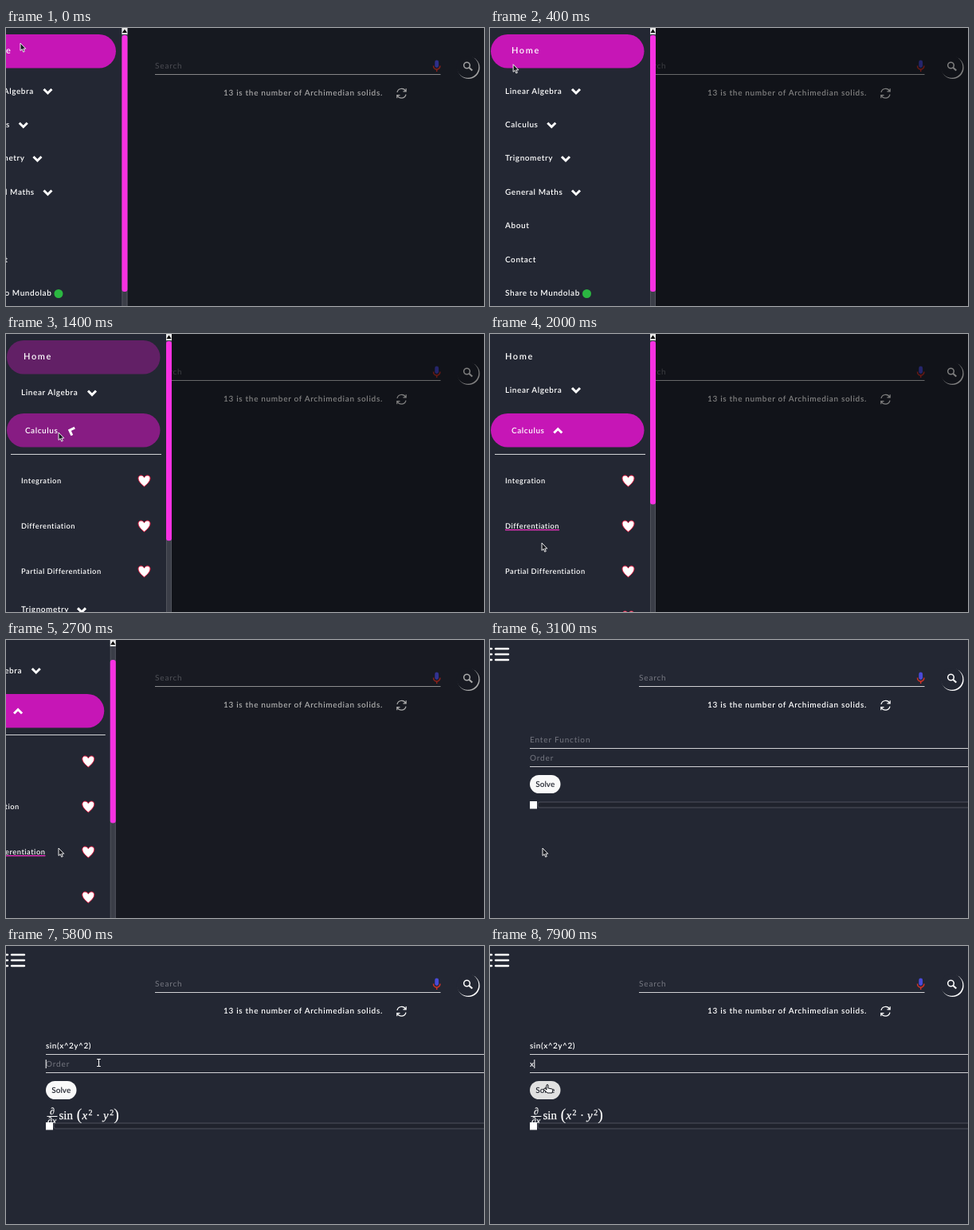
Recreate the animation shown at these times as an HTML page. Size 600 by 350 pixels, loop 8 s.

```html
<!DOCTYPE html>
<html lang="en">
<head>
<meta charset="utf-8">
<title>Maths solver</title>
<style>
  html, body { margin: 0; width: 100%; height: 100%; overflow: hidden; background: #232733; }
  svg { display: block; width: 600px; height: 350px; }
  text { font: 10px Lato, sans-serif; fill: #fff; text-rendering: geometricPrecision; white-space: pre; }
  .fact { font-weight: 600; letter-spacing: .68px; }
  .value { font-weight: 600; letter-spacing: .5px; }
  .hint { fill: #757780; letter-spacing: .85px; }
  .menu text { font-weight: 600; letter-spacing: .58px; }
  .menu .home { font-size: 11px; letter-spacing: 1.6px; }
  #topics text { font-size: 9.3px; letter-spacing: .5px; }
  .pill { fill: #c616b6; }
  .line { fill: none; stroke: #fff; }
  .rule { fill: none; stroke: #d2d3d6; }
  .math text { font: 15px "Liberation Serif", serif; stroke: #fff; stroke-width: .25; }
  .math .it { font-style: italic; }
  .math .sup { font-size: 10px; }
  .math .frac { font-size: 12px; }
  .math .big { font-size: 21px; stroke-width: 0; }
</style>
</head>
<body>
<svg viewBox="0 0 600 350">
  <defs>
    <path id="chev" d="M-5-2.5 0 2.5 5-2.5" fill="none" stroke="#fff" stroke-width="3"/>
    <path id="heart" d="M0 7C-4 4-7.5 0-7.5-3.2-7.5-7.8-2-8.3 0-4.3 2-8.3 7.5-7.8 7.5-3.2 7.5 0 4 4 0 7Z" fill="#fff" stroke="#e0183f"/>
    <clipPath id="fold"><rect id="foldBox" x="0" y="146" width="201" height="0"/></clipPath>
    <clipPath id="mathBox"><rect x="48" y="198" width="552" height="25"/></clipPath>
  </defs>
  <rect width="600" height="350" fill="#232733"/>

  <g class="line" stroke-width="2.4" stroke-linecap="round">
    <path d="M7 11H23M7 18H23M7 25H23M.5 11H2M.5 18H2M.5 25H2"/>
  </g>
  <text class="hint" x="187" y="51">Search</text>
  <path class="rule" d="M187 58.5H545.5"/>
  <g fill="none">
    <path d="M536.5 47.5a4.2 4.6 0 0 0 8.4 0M540.7 52v3" stroke="#d23228" stroke-width="1.5"/>
    <rect x="538.3" y="40.5" width="4.8" height="9.5" rx="2.4" fill="#4a4ad8"/>
  </g>
  <circle cx="580.6" cy="50" r="14" fill="#fff"/>
  <circle cx="579.5" cy="48.9" r="13.8" fill="#232733"/>
  <g class="line" stroke-width="1.5">
    <circle cx="578.5" cy="47" r="3.8"/>
    <path d="M581.4 49.9 585.3 53.6" stroke-width="2"/>
  </g>
  <text class="fact" x="273" y="85">13 is the number of Archimedian solids.</text>
  <path class="line" stroke-width="1.2" d="M491 81a5.7 5.7 0 0 1 10.6-1.6M502.2 76.3v3.6h-3.7M502 83.6a5.7 5.7 0 0 1-10.6 1.6M490.8 88.3v-3.6h3.7"/>

  <g id="form">
    <text id="func" x="50" y="129"></text>
    <text id="order" x="50" y="151.5"></text>
    <path class="rule" d="M50 136.5H600M50 159.5H600"/>
    <rect id="caret" x="49.7" width="1" height="11" fill="#fff"/>
    <rect id="solve" x="50" y="170" width="38.5" height="23" rx="11.5"/>
    <text x="57.3" y="185" style="fill:#22252f;font-weight:600">Solve</text>
    <g id="bar">
      <rect x="60" y="204" width="545" height="7" rx="3" fill="#20232d" stroke="#3f424d" stroke-width="1.4"/>
      <rect x="50" y="203" width="9" height="9.5" fill="#fff"/>
    </g>
    <g class="math" clip-path="url(#mathBox)">
      <g data-from="1">
        <text class="it frac" x="55" y="212">∂</text>
        <path class="line" d="M51.5 214.5H64.5"/>
        <text class="it frac" x="52" y="223.5">∂x</text>
      </g>
      <text data-from="3" x="66.5" y="218">sin</text>
      <text data-from="4" class="big" x="88.5" y="218.5">(</text>
      <text data-from="5" class="it" x="95.5" y="218">x</text>
      <text data-from="7" class="sup" x="103.5" y="212.5">2</text>
      <text data-from="8" x="113" y="218">·</text>
      <text data-from="8" class="it" x="122" y="218">y</text>
      <text data-from="10" class="sup" x="130.3" y="212.5">2</text>
      <text data-from="11" class="big" x="135" y="218.5">)</text>
    </g>
  </g>

  <rect id="shade" width="600" height="350"/>

  <g id="side" class="menu">
    <rect width="208" height="350" fill="#232733"/>
    <g id="list">
      <rect id="homePill" class="pill" x="1" y="8" width="192.5" height="42.5" rx="21.2"/>
      <text id="home" class="home" y="32">Home</text>
      <g id="linear">
        <text x="19" y="82.5">Linear Algebra</text>
        <use href="#chev" x="108" y="79.5"/>
      </g>
      <rect id="calcPill" class="pill" x="1" y="100" width="192.5" height="42.5" rx="21.2"/>
      <g id="calc">
        <text x="19" y="124.5">Calculus</text>
        <g id="calcChev"><use href="#chev"/></g>
      </g>
      <g clip-path="url(#fold)">
        <path class="rule" d="M6 151.5H195"/>
        <g id="topics"></g>
      </g>
      <g id="rest">
        <text x="19" y="167">Trignometry</text><use href="#chev" x="95" y="164.5"/>
        <text x="19" y="209.5">General Maths</text><use href="#chev" x="108" y="207"/>
        <text x="19" y="252">About</text>
        <text x="19" y="294.5">Contact</text>
        <text x="19" y="337">Share to Mundolab</text>
        <circle cx="121.5" cy="334.5" r="5.5" fill="#2bb741"/>
      </g>
    </g>
    <rect x="201" width="7" height="350" fill="#3b3e48"/>
    <path d="M201.5 0V350M207.5 0V350" stroke="#50535c"/>
    <rect x="201" width="7" height="8" fill="#e8e8e8"/>
    <path d="M201.5 6 204.5 1.5 207.5 6Z"/>
    <rect id="thumb" x="201" width="7" rx="3" fill="#f731e2"/>
  </g>

  <g id="pointer">
    <path data-kind="arrow" d="M0 0V9.5L2.2 7.6 3.7 11.2 5.3 10.5 3.8 7.1H6.8Z" fill="#15171d" stroke="#fff" stroke-width=".9"/>
    <path data-kind="beam" class="line" d="M-2.3-4.5H-.6L0-4 .6-4.5H2.3M-2.3 4.5H-.6L0 4 .6 4.5H2.3M0-4.2V4.2" stroke-width="1.1"/>
    <path data-kind="hand" d="M-1-4Q0-5 1-4V0L6 1Q7 1.3 6.8 3L6 6H0L-4.5 1.5Q-4.5 0-3 .3L-1 2Z" fill="#f4f4f4" stroke="#15171d"/>
  </g>
</svg>
<script>
const LOOP = 8000, FORMULA = "sin(x^2y^2)", TYPE_AT = 4550, KEY_MS = 90, ROW = 57;
const ui = Object.fromEntries([...document.querySelectorAll("[id]")].map(e => [e.id, e]));
const set = (e, attrs) => { for (const k in attrs) e.setAttribute(k, attrs[k]); };
const move = (e, x, y) => e.setAttribute("transform", `translate(${x} ${y})`);
const clamp = (v, lo = 0, hi = 1) => Math.min(hi, Math.max(lo, v));
const mix = (a, b, p) => a + (b - a) * p;
const ease = (t, from, to) => { const p = clamp((t - from) / (to - from)); return p * p * (3 - 2 * p); };

// time, x, y of the pointer
const PATH = [
  [0, 18, 19], [250, 22, 30], [900, 74, 145], [1150, 66, 124], [1550, 66, 124],
  [2000, 65, 263], [2150, 66, 262], [3200, 66, 262], [3700, 150, 190], [4050, 154, 129],
  [4600, 154, 129], [5400, 134, 130], [5700, 116.5, 147], [6900, 116.5, 147], [7600, 72, 179]
];
function pointerAt(t) {
  const i = PATH.findIndex(k => k[0] > t);
  if (i < 0) return PATH.at(-1).slice(1);
  const a = PATH[i - 1], b = PATH[i], p = ease(t, a[0], b[0]);
  return [mix(a[1], b[1], p), mix(a[2], b[2], p)];
}

ui.topics.innerHTML = ["Integration", "Differentiation", "Partial Differentiation", "Limits", "Series"]
  .map((name, i) => `<g><text x="19" y="${187.5 + i * ROW}">${name}</text>
    <path stroke="#f731c8" stroke-width="1.4" d=""/><use href="#heart" x="173.5" y="${185 + i * ROW}"/></g>`).join("");
const topics = [...ui.topics.children];
const terms = [...document.querySelectorAll("[data-from]")];
const kinds = [...document.querySelectorAll("[data-kind]")];

function drawMenu(t, y) {
  const off = t < 2000 ? -56 * (1 - clamp(t / 250)) ** 2 : -208 * ease(t, 2545, 2945);
  const open = ease(t, 1200, 1550), scroll = 32 * ease(t, 2200, 2450);
  move(ui.side, off, 0);
  ui.side.style.display = off > -208 ? "" : "none";
  set(ui.shade, { opacity: .5 * (1 + off / 208) });
  move(ui.list, 0, -scroll);
  set(ui.homePill, { opacity: 1 - open });
  set(ui.home, { x: mix(27, 19, open) });
  move(ui.linear, 0, -9 * open);
  set(ui.calcPill, { opacity: open });
  move(ui.calc, 8 * open, 0);
  set(ui.calcChev, { transform: `translate(77.3 122) rotate(${180 * open})` });
  set(ui.foldBox, { height: 300 * open });
  move(ui.rest, 0, 300 * open);
  set(ui.thumb, { y: 9 + scroll / 2, height: mix(323, 205.5, open) });
  topics.forEach((g, i) => {
    const hot = open > .9 && Math.abs(y + scroll - 184 - i * ROW) < ROW / 2;
    const [label, rule] = g.children;
    set(rule, { d: hot ? `M19 ${189.6 + i * ROW}h${label.getComputedTextLength()}` : "" });
  });
}

function field(e, value, hint) {
  e.textContent = value || hint;
  e.setAttribute("class", value ? "value" : "hint");
}

function drawForm(t) {
  ui.form.style.display = t >= 3000 ? "" : "none";
  const keys = clamp(Math.floor((t - TYPE_AT) / KEY_MS) + 1, 0, FORMULA.length);
  const order = t >= 6700 ? "x" : "";
  field(ui.func, FORMULA.slice(0, keys), "Enter Function");
  field(ui.order, order, "Order");
  terms.forEach(e => e.style.display = keys >= +e.dataset.from ? "" : "none");
  move(ui.bar, 0, keys ? 19 : 0);

  const second = t >= 5650, input = second ? ui.order : ui.func;
  const since = order ? 6700 : second ? 5650 : keys ? TYPE_AT + (keys - 1) * KEY_MS : 4100;
  const filled = second ? order : keys;
  set(ui.caret, {
    x: filled ? 49.7 + input.getComputedTextLength() : 49.7,
    y: second ? 143 : 120,
    opacity: t >= since && (t - since) % 1060 < 530 ? 1 : 0
  });
  const tone = Math.round(mix(249, 225, ease(t, 7500, 7850)));
  set(ui.solve, { fill: `rgb(${tone},${tone},${tone})` });
}

function draw(t) {
  const [x, y] = pointerAt(t);
  drawMenu(t, y);
  drawForm(t);
  move(ui.pointer, x, y);
  const kind = t < 3950 ? "arrow" : y < 161 ? "beam" : y < 170 ? "arrow" : "hand";
  kinds.forEach(e => e.style.display = e.dataset.kind === kind ? "" : "none");
}

const start = performance.now();
function tick() {
  draw((performance.now() - start) % LOOP);
  requestAnimationFrame(tick);
}
tick();
</script>
</body>
</html>
```
